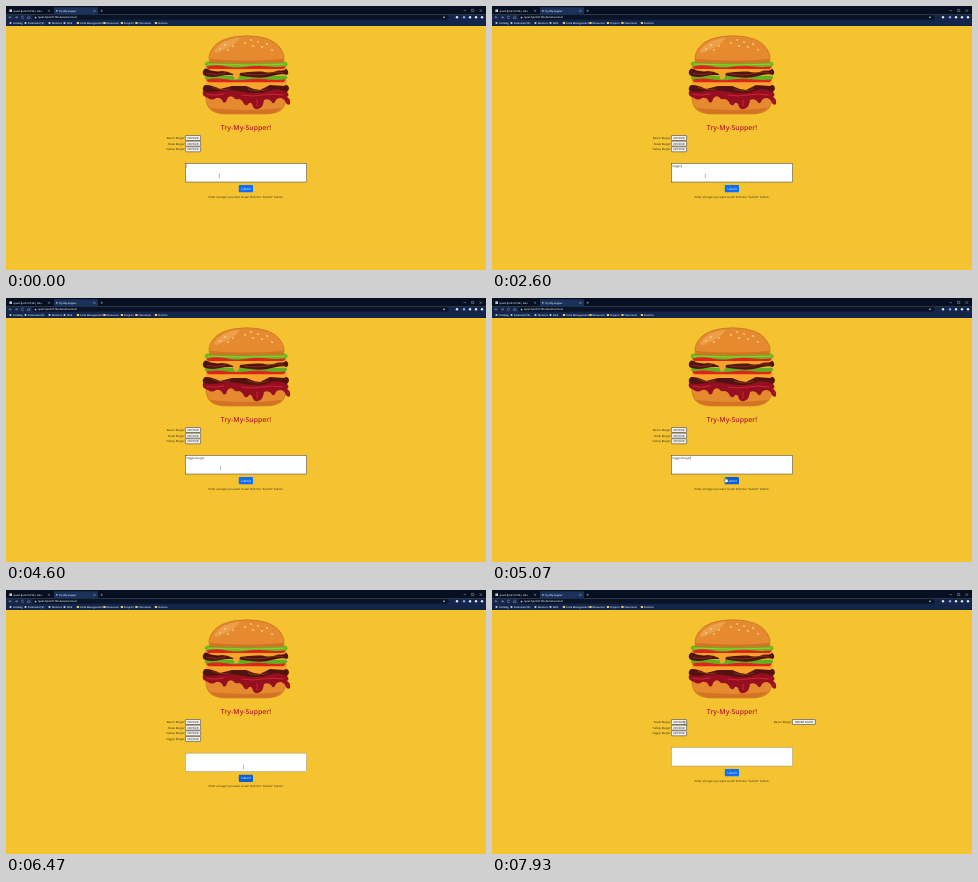
Write an HTML page that moves like this. It is 480 px wide and 264 px high and loops after 8 s.

```html
<!DOCTYPE html>
<html lang="en">
<head>
<meta charset="utf-8">
<title>Burger list</title>
<style>
  html, body { margin: 0; height: 100%; overflow: hidden; background: #f5c330; }
  svg { display: block; width: 480px; height: 264px; }
  text { font: 2.82px "Open Sans", "Noto Sans", sans-serif; text-rendering: geometricPrecision; white-space: pre; fill: #2b2415; }
  .bar text { font-size: 2.5px; font-weight: 600; fill: #e3e8f2; }
  .mid { text-anchor: middle; }
  .end { text-anchor: end; }
  .title { font-size: 6.9px; font-weight: 600; fill: #b51f2a; }
  .line { fill: none; stroke: #c3cad8; stroke-width: .4; }
</style>
</head>
<body>
<svg viewBox="0 0 480 264">
  <rect width="480" height="264" fill="#f5c330"/>

  <g class="bar">
    <rect width="480" height="8.4" fill="#071020"/>
    <path d="M48 8.4V2.2q0-1 1-1H91q1 0 1 1V8.4z" fill="#1a315c"/>
    <rect y="8.2" width="480" height="11.8" fill="#13264a"/>
    <rect x="26.5" y="8.9" width="416" height="4.8" rx="2.4" fill="#0a1426"/>
    <rect x="3.4" y="3.4" width="2.6" height="2.6" fill="#c9c4dd"/>
    <text x="7.6" y="5.7">quiet-fjord-51736 | Hos</text>
    <text x="53" y="5.7">Try-My-Supper</text>
    <circle cx="50.8" cy="4.8" r=".9" fill="#a9b3c6"/>
    <path class="line" d="M42 3.8l2 2m0-2l-2 2M87.4 3.8l2 2m0-2l-2 2M94.5 4.8h2.4m-1.2-1.2v2.4M457.6 4.6h2.4M465.6 3.4h2.2v2.2h-2.2zM473.6 3.4l2.4 2.4m0-2.4l-2.4 2.4
      M5.6 11.3H3m1.2-1.2L3 11.3l1.2 1.2M9 11.3h2.6m-1.2-1.2l1.2 1.2-1.2 1.2M17.8 10.6a1.3 1.3 0 1 0 0 1.4M21.4 12.4v-1.2l1.3-1.1 1.3 1.1v1.2z"/>
    <rect x="28.8" y="10.8" width="1.5" height="1.5" fill="#c3cad8"/>
    <text x="32" y="12.3">quiet-fjord-51736.demohost.test</text>
    <g id="icons"></g>
    <g id="marks"></g>
  </g>

  <g id="burger" stroke-linejoin="round" stroke-linecap="round">
    <path d="M200 87H280Q281 96 277 102Q272 108 259 108H221Q208 108 203 102Q199 96 200 87z" fill="#e58a2e" stroke="#b65b20" stroke-width=".5"/>
    <path d="M204 102Q240 106 276 102Q271 107.7 259 107.7H221Q209 107.7 204 102z" fill="#d27424"/>
    <path d="M199 79Q195 82 198 86Q210 89 240 88T281 86Q285 82 281 79z" fill="#521310"/>
    <path d="M197 85Q204 87 214 85T238 86T262 85T281 86Q284 89 281 91Q285 93 284 98Q282 100 280 97Q279 93 275 92Q270 92 269 96Q267 99 265 95Q262 92 258 94Q257 101 254 102Q250 105 247 101Q246 96 243 97Q241 101 238 98Q236 93 232 93Q229 94 227 91Q223 89 221 93Q220 98 217 96Q215 91 210 92Q206 95 202 92Q195 90 197 85z" fill="#960f20"/>
    <path d="M201 88.5Q210 90 218 88M236 89Q246 91 256 89T277 89M251 94v6M282 94v2" fill="none" stroke="#cc2438" stroke-width="1"/>
    <path d="M200 75.5H280Q283 78 278 80L264 79L254 84Q246 83 240 80L226 80L214 83Q206 79 200 79z" fill="#f6a42b"/>
    <path d="M206 81Q214 85 224 83M242 83Q252 87 262 83" fill="none" stroke="#8a3a1c" stroke-width=".8"/>
    <path d="M201 72H279Q281 75 277 76.2H203Q199 75 201 72z" fill="#e0231d"/>
    <path d="M200 69.8H280Q283 72 279 73.5Q270 74.5 260 73.3T240 73.6T220 73.3T201 73.5Q197 72 200 69.8z" fill="#62b01f"/>
    <path d="M199 62.5Q195 66 198 69.5Q204 72 214 70T240 70.5T266 70T281 69Q284 66 280 62.5z" fill="#521310"/>
    <path d="M201 67.5Q210 70 220 67M238 68Q252 70 262 67.5T278 67" fill="none" stroke="#7f3120" stroke-width=".9"/>
    <path d="M200 62H280Q280 65 272 64.5Q264 68 256 65.5Q244 65 234 67Q233 73.5 230 73.5Q227.5 73 227 68Q219 64 212 65.5Q204 65 200 62z" fill="#f6a42b"/>
    <path d="M201 59H279Q281 61.5 277 63H203Q199 61.5 201 59z" fill="#e0231d"/>
    <path d="M201 55.5H279Q284 58 280 60.3Q270 61.5 260 60.3T240 60.8T220 60.3T201 60.5Q196 58 201 55.5z" fill="#6cb91e"/>
    <path d="M202 58.2Q240 60 278 58.2" fill="none" stroke="#9bd33b" stroke-width=".8"/>
    <path d="M204 56.5Q201 51 206 43Q214 30 241 29.7Q267 30 275 43Q280 51 277 56.5Q240 58 204 56.5z" fill="#e58a2e" stroke="#b65b20" stroke-width=".5"/>
    <path d="M208 45Q216 33 234 31.5Q229 40 213 46Q209 49 208 45z" fill="#eda04a"/>
    <path d="M204 53Q240 56 277 53Q278 55 276.5 56.3Q240 57.6 205 56.3z" fill="#d27424"/>
    <g id="seeds" fill="#f7d08a"></g>
  </g>

  <text class="title mid" x="240" y="124">Try-My-Supper!</text>
  <g id="rows"></g>

  <g id="form">
    <rect id="area" x="179.5" y="157.5" width="121" height="18.5" fill="#fff" stroke-width=".5"/>
    <text id="typed" x="180.3" y="161.2"></text>
    <rect id="caret" y="158.5" width=".3" height="3.2" fill="#222"/>
    <rect id="submit" x="232.8" y="179.1" width="14.2" height="7.2" rx=".9"/>
    <text class="mid" x="240" y="183.8" style="fill:#fff;font-size:3px">Submit</text>
    <text class="mid" x="240" y="191.5">Enter a burger you want to eat! Click the "Submit" button.</text>
  </g>

  <path id="beam" d="M-.5-1.6H.5M0-1.6V1.6M-.5 1.6H.5" fill="none" stroke="#444" stroke-width=".35"/>
  <path id="hand" d="M-.5 0Q0-.6.5 0V1.5L2.3 2V3.6L1.6 5H-.6L-1.8 3L-1.4 2.5L-.5 3.1z" fill="#fff" stroke="#222" stroke-width=".35"/>
  <path id="arrow" d="M0 0V4L1 3.1L1.7 4.6L2.3 4.3L1.6 2.9H2.9z" fill="#fff" stroke="#222" stroke-width=".35"/>
</svg>

<script>
const LOOP = 8000, SENT = 5600, EATEN = 7730;
const $ = id => document.getElementById(id);
const set = (id, attrs) => { for (const k in attrs) $(id).setAttribute(k, attrs[k]); };
const show = (id, on) => set(id, { visibility: on ? 'visible' : 'hidden' });

const marks = [[7, 'Codelog'], [22, 'Extension(18)'], [46, 'Mentors'], [61, 'Web'], [74, 'Code Management'],
  [100.5, 'Resources'], [118, 'Projects'], [132.5, 'Classroom'], [152, 'Practice']];
$('marks').innerHTML = marks.map(([x, name], i) => (i < 4
  ? `<circle cx="${x - 2.5}" cy="17" r="1.1" fill="#c3cad8"/>`
  : `<rect x="${x - 3.2}" y="16" width="2.3" height="2" fill="#e9c66a"/>`) +
  `<text x="${x}" y="17.9">${name}</text>`).join('');
$('icons').innerHTML = [438, 451, 458, 464, 470, 476].map((x, i) =>
  `<circle cx="${x}" cy="11.3" r="${i ? 1.2 : .8}" fill="${i == 2 ? '#7fa6e8' : '#dfe4ee'}"/>`).join('');

const seeds = [[214, 43], [219, 39], [222, 44], [227, 40], [239, 37], [245, 34], [247, 40], [252, 36], [256, 41], [261, 38], [266, 44]];
$('seeds').innerHTML = seeds.map(([x, y]) =>
  `<ellipse cx="${x}" cy="${y}" rx="1.3" ry=".7" transform="rotate(${(x - 240) * 1.2} ${x} ${y})"/>`).join('');

function row(name, i, focus, x = 179.4, width = 15.2, label = 'DEVOUR') {
  const y = 132 + i * 5.65;
  return `<text class="end" x="${x - .8}" y="${y + 1}">${name} Burger</text>
    <rect x="${x}" y="${y - 2.5}" width="${width}" height="5" rx=".5" fill="${focus ? '#e2e2e2' : '#efeff2'}"
      stroke="${focus ? '#111' : '#4c4a4a'}" stroke-width="${focus ? .8 : .6}"/>
    <text class="mid" x="${x + width / 2}" y="${y + 1}">${label}</text>`;
}

let drawn = '';
function drawRows(phase, focus) {
  const key = phase + ' ' + focus;
  if (key == drawn) return;
  drawn = key;
  const names = ['Bacon', 'Steak', 'Turkey', 'Veggie'].slice(phase == 2 ? 1 : 0, phase ? 4 : 3);
  $('rows').innerHTML = names.map((n, i) => row(n, i, focus && i == 0)).join('') +
    (phase == 2 ? row('Bacon', 0, false, 300.4, 23, 'ORDER AGAIN') : '');
}

const phrase = 'Veggie Burger';
const keys = [1600, 1800, 2000, 2130, 2330, 2530, 2930, 3000, 3130, 3200, 3330, 3400, 3600];

// Pointer stops: time, x, y
const stops = [[0, 213.3, 170], [2900, 213.3, 170], [3400, 214.5, 170], [4600, 214.5, 170], [5330, 241.5, 183.5],
  [6250, 241.5, 183.5], [6470, 237.5, 177], [6930, 192.5, 131], [LOOP, 192.5, 131]];
function pointer(t) {
  const i = stops.findIndex(s => s[0] > t);
  const [t0, x0, y0] = stops[i - 1], [t1, x1, y1] = stops[i];
  const p = (t - t0) / (t1 - t0), e = p * p * (3 - 2 * p);
  return [x0 + (x1 - x0) * e, y0 + (y1 - y0) * e];
}

function render(t) {
  const phase = t < SENT ? 0 : t < EATEN ? 1 : 2;
  const drop = phase == 1 ? 5.65 : 0;
  drawRows(phase, t >= 7070 && phase == 1);
  set('form', { transform: `translate(0 ${drop})` });

  const focus = t < 5400;
  set('area', { stroke: focus ? '#3a3a3a' : '#99937f' });
  const count = keys.filter(k => k <= t).length;
  $('typed').textContent = phase ? '' : phrase.slice(0, count);
  const lit = count ? Math.floor((t - keys[count - 1]) / 530) % 2 == 0 : t < 200 || t >= 800 && t < 1330;
  show('caret', focus && lit);
  set('caret', { x: 180.4 + (count ? $('typed').getComputedTextLength() : 0) });

  const [x, y] = pointer(t);
  const inside = (l, top, w, h) => x > l && x < l + w && y > top && y < top + h;
  const hover = inside(232.8, 179.1 + drop, 14.2, 7.2);
  const typing = inside(179.5, 157.5 + drop, 121, 18.5);
  set('submit', { fill: hover || t > 5400 && t < 6600 ? '#0b5ed7' : '#0d6efd',
    stroke: t > 5330 && t < SENT ? '#5f91c4' : 'none', 'stroke-width': .8 });
  const kind = hover ? 'hand' : typing ? 'beam' : 'arrow';
  for (const id of ['beam', 'hand', 'arrow']) {
    show(id, id == kind);
    set(id, { transform: `translate(${x} ${y})` });
  }
}

const start = performance.now();
function tick() {
  render((performance.now() - start) % LOOP);
  requestAnimationFrame(tick);
}
tick();
</script>
</body>
</html>
```
